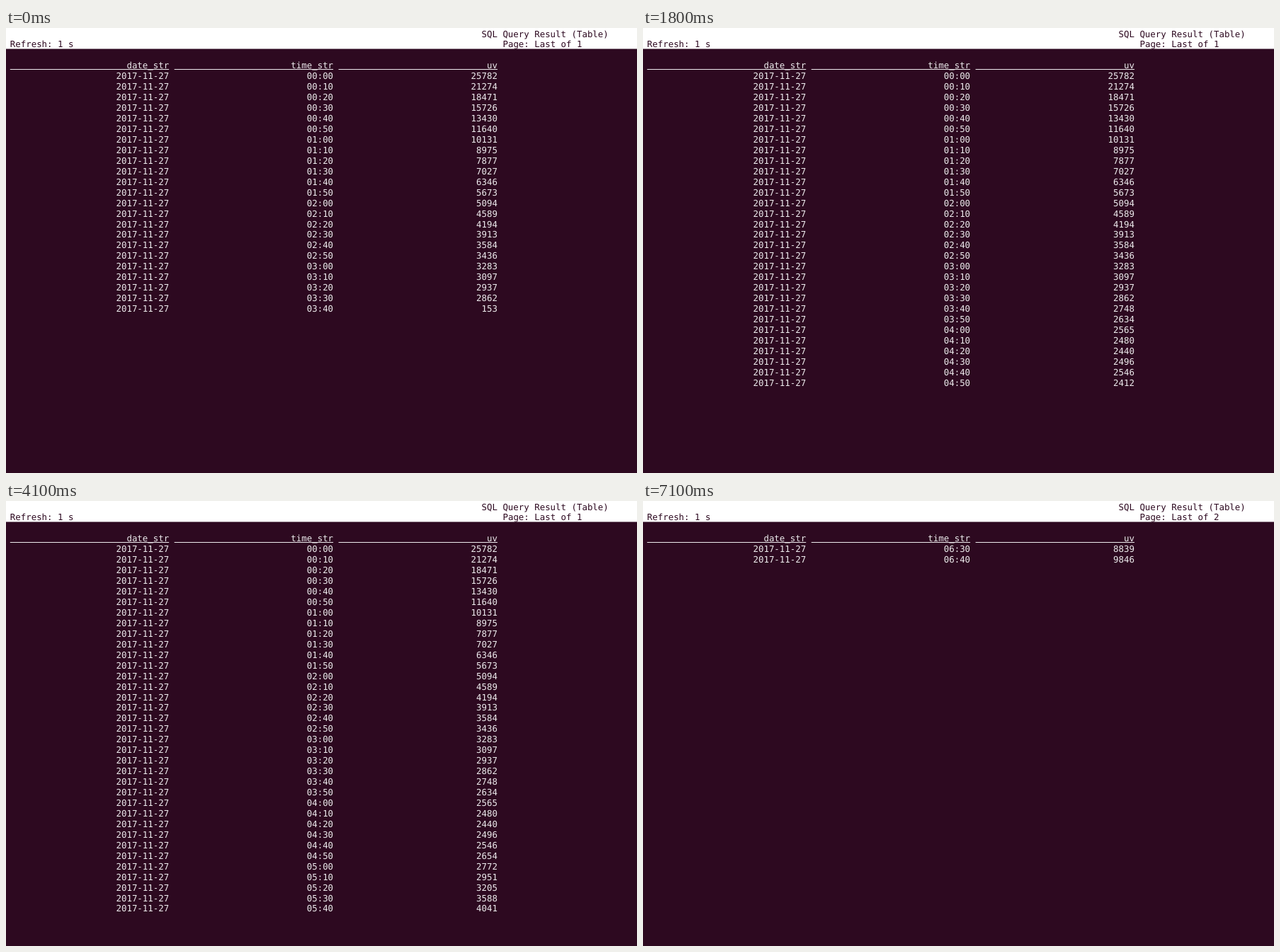
Recreate the animation shown at these times as an HTML page. Size 891x629 px, loop 7.2 s.

```html
<!DOCTYPE html>
<html lang="en">
<head>
<meta charset="utf-8">
<title>SQL Query Result</title>
<style>
  html, body { margin: 0; width: 100%; height: 100%; overflow: hidden; background: #2d0920; }
  svg { display: block; }
  text {
    font: 12.425px "DejaVu Sans Mono", "Noto Sans Mono", monospace;
    fill: #eeecee;
    white-space: pre;
    text-rendering: geometricPrecision;
  }
  .end { text-anchor: end; }
  .bold { font-weight: bold; fill: #fff; }
  .bar { fill: #2d0920; }
</style>
</head>
<body>
<svg id="screen" width="891" height="629" viewBox="0 0 891 629"></svg>
<script>
const LOOP = 7200, CELL = 7.48, LINE = 14.946, LEFT = 5.8;
const screen = document.getElementById('screen');

// Visitors per ten minutes, starting at midnight
const visitors = [
  25782, 21274, 18471, 15726, 13430, 11640, 10131, 8975, 7877, 7027,
  6346, 5673, 5094, 4589, 4194, 3913, 3584, 3436, 3283, 3097,
  2937, 2862, 2748, 2634, 2565, 2480, 2440, 2496, 2546, 2654,
  2772, 2951, 3205, 3588, 4041, 4693, 5524, 6555, 7645, 8839, 9846
];

// Each refresh: start time, page, first row, end row, value of the last row
const refreshes = [
  { at: 0, page: 1, first: 0, end: 23, last: 153 },
  { at: 700, page: 1, first: 0, end: 30, last: 2412 },
  { at: 1700, page: 1, first: 0, end: 30, last: 2412 },
  { at: 2700, page: 1, first: 0, end: 35, last: 4041 },
  { at: 3700, page: 1, first: 0, end: 35, last: 4041 },
  { at: 4800, page: 1, first: 0, end: 38, last: 6555 },
  { at: 5800, page: 2, first: 39, end: 41, last: 9846 }
];

const value = (r, i) => i === r.end - 1 ? r.last : visitors[i];
const pad = n => String(n).padStart(2, '0');
const clock = i => pad(Math.floor(i / 6)) + ':' + pad(i % 6 * 10);

// Text on the terminal grid
const put = (col, row, str, cls = '') =>
  `<text x="${LEFT + col * CELL}" y="${12.5 + row * LINE}" class="${cls}">${str}</text>`;
const cell = (column, row, str, bold) =>
  put(column * 31 + 30, row, str, bold ? 'end bold' : 'end');

function draw(index) {
  const now = refreshes[index];
  const before = refreshes[Math.max(0, index - 1)];
  const samePage = now.page === before.page;
  let out = '<rect width="891" height="29.5" fill="#fff"/>' +
    put(89, 0, 'SQL Query Result (Table)', 'bar') +
    put(0, 1, 'Refresh: 1 s', 'bar') +
    put(93, 1, 'Page: Last of ' + now.page, 'bar');

  ['date_str', 'time_str', 'uv'].forEach((name, c) => {
    out += cell(c, 3, name) +
      `<rect x="${LEFT + c * 31 * CELL}" y="58" width="${30 * CELL}" height="1" fill="#eeecee"/>`;
  });

  for (let i = now.first; i < now.end; i++) {
    const row = 4 + i - now.first;
    const fresh = samePage && i >= before.end;
    const changed = samePage && value(now, i) !== value(before, i);
    out += cell(0, row, '2017-11-27', fresh) +
      cell(1, row, clock(i), fresh) +
      cell(2, row, value(now, i), fresh || changed);
  }
  screen.innerHTML = out;
}

let shown = -1;
const start = performance.now();
function tick() {
  const t = (performance.now() - start) % LOOP;
  const index = refreshes.filter(r => r.at <= t).length - 1;
  if (index !== shown) draw(shown = index);
  requestAnimationFrame(tick);
}
tick();
</script>
</body>
</html>
```
